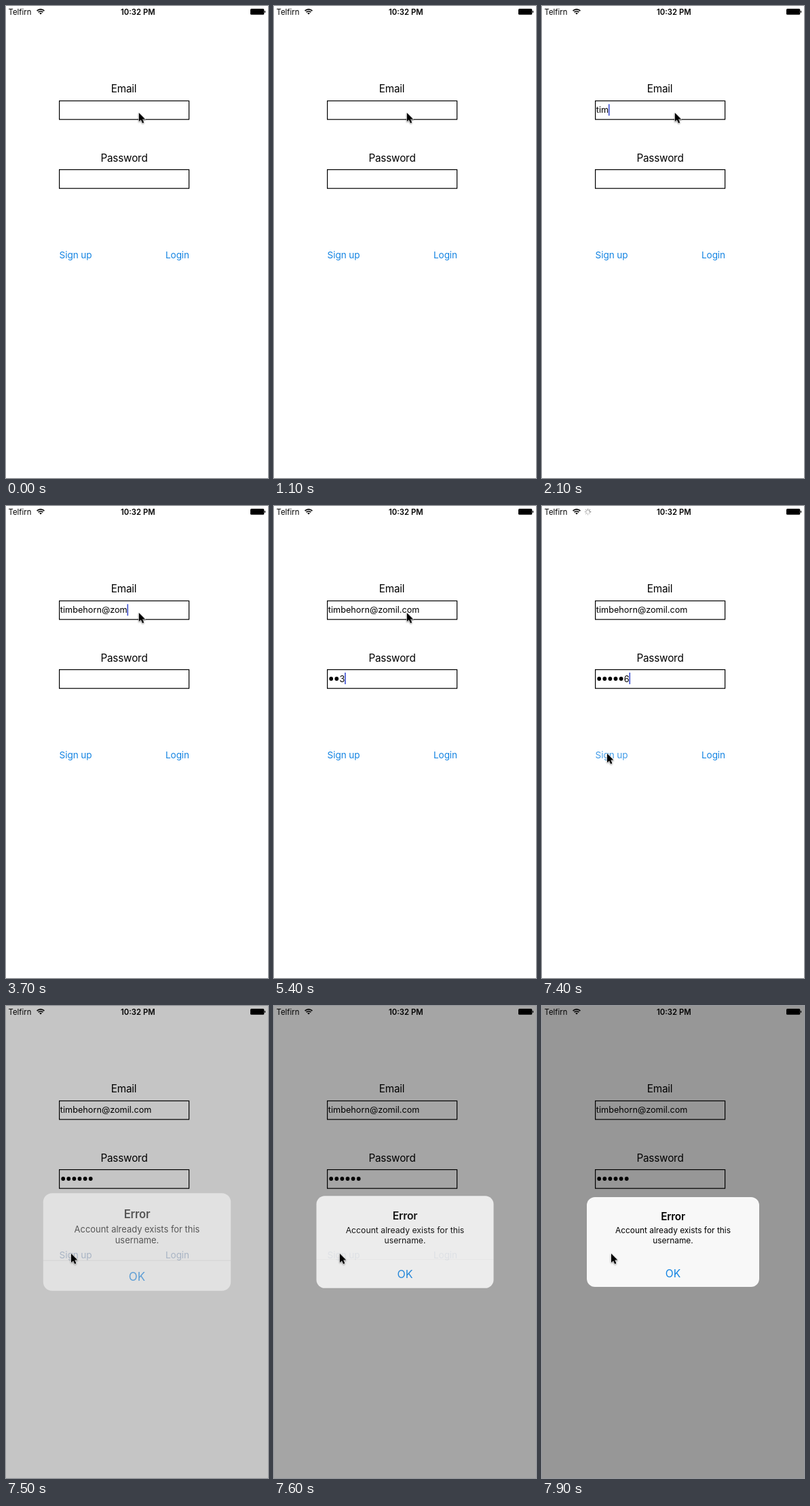
Animation, 386 px wide and 694 px high, one loop 8 s. Source, as an HTML page:

```html
<!DOCTYPE html>
<html lang="en">
<head>
<meta charset="utf-8">
<title>Sign up form</title>
<style>
  html, body { margin: 0; width: 100%; height: 100%; overflow: hidden; background: #fff; }
  svg { display: block; width: 100vw; height: 100vh; }
  text { font-family: Inter, "Open Sans", sans-serif; white-space: pre; }
  .mid { text-anchor: middle; }
  .bar { font-size: 11.3px; }
  .label { font-size: 15.3px; letter-spacing: -.2px; }
  .link { font-size: 13.6px; letter-spacing: -.1px; fill: #1283e2; }
  .input { font-size: 12.7px; }
  .bold { font-weight: 600; }
  .box { fill: none; stroke: #000; stroke-width: 1.2; }
  .note { font-size: 11.9px; }
  #cursor { filter: drop-shadow(0 1.5px 1.2px rgba(0, 0, 0, .45)); }
</style>
</head>
<body>
<svg viewBox="0 0 386 694">
  <rect width="386" height="694" fill="#fff"/>

  <text class="bar" x="3.6" y="13">Telfirn</text>
  <g fill="none" stroke="#000" stroke-width="1.7">
    <path d="M45.6 7.1a7.5 7.5 0 0 1 10.8 0M47.6 9.2a4.7 4.7 0 0 1 6.8 0"/>
    <path d="M51 12.6l-1.8-1.9a2.6 2.6 0 0 1 3.6 0z" fill="#000" stroke="none"/>
  </g>
  <g id="spinner" stroke="#777" stroke-width="1.1" stroke-linecap="round"></g>
  <text class="bar bold mid" x="194.3" y="13">10:32 PM</text>
  <rect x="360" y="4" width="20.3" height="8.8" rx="1.6"/>
  <rect x="380.8" y="6.9" width="1.3" height="3" rx=".6"/>

  <text class="label mid" x="173.5" y="127.3">Email</text>
  <rect class="box" x="78.6" y="139.5" width="191" height="27.3"/>
  <text class="input" id="email" x="79.8" y="157.3"></text>

  <text class="label mid" x="174" y="228.6">Password</text>
  <rect class="box" x="78.6" y="240.6" width="191" height="27.6"/>
  <g id="dots"></g>
  <text class="input" id="digit" y="258.6"></text>
  <rect id="caret" width="1.6" height="17" fill="#3c4fd0"/>

  <text class="link" id="signup" x="78.6" y="371">Sign up</text>
  <text class="link" id="login" x="270" y="371" text-anchor="end">Login</text>

  <rect id="shade" width="386" height="694"/>
  <g id="alert">
    <rect x="-127" y="-66" width="254" height="132" rx="12" fill="#f8f8f8"/>
    <path id="rule" d="M-127 25H127" stroke="#b4b4b4" stroke-width=".8"/>
    <text class="label bold mid" y="-32">Error</text>
    <text class="note mid" y="-13">Account already exists for this</text>
    <text class="note mid" y="2">username.</text>
    <text class="mid" y="52" font-size="15.6" fill="#1283e2">OK</text>
  </g>

  <path id="cursor" d="M0 0V13.2l3-2.8 2.2 4.9 2.2-1-2.1-4.7h4.1z" stroke="#fff" stroke-width="1" paint-order="stroke"/>
</svg>
<script>
const LOOP = 8000, STEP = 100;
const EMAIL = "timbehorn@zomil.com";
const EMAIL_KEYS = [1800, 1800, 1900, 2300, 2400, 2500, 2700, 2800, 2900, 3100,
                    3300, 3600, 3700, 3800, 3900, 4100, 4200, 4400, 4600];
const PASS_KEYS = [5100, 5200, 5400, 5600, 5900, 6100];
const PASS_FOCUS = 4800, ALERT = 7400, DOT = 8.1;

const $ = id => document.getElementById(id);
const [email, digit, caret, signup, login, shade, alertBox, rule, cursor, spinner, dots] =
  ["email", "digit", "caret", "signup", "login", "shade", "alert", "rule", "cursor", "spinner", "dots"].map($);

const set = (el, attrs) => { for (const k in attrs) el.setAttribute(k, attrs[k]); };
const add = (parent, tag, attrs) => {
  const el = document.createElementNS("http://www.w3.org/2000/svg", tag);
  set(el, attrs);
  return parent.appendChild(el);
};
const clamp = v => Math.min(1, Math.max(0, v));
const ramp = (t, from, to) => clamp((t - from) / (to - from));
const mix = (a, b, p) => a + (b - a) * p;
const smooth = p => p * p * (3 - 2 * p);
const typed = (keys, t) => keys.filter(k => t >= k).length;

const spokes = Array.from({ length: 8 }, (_, i) =>
  add(spinner, "path", { d: "M0 -2.4V-4.3", transform: `translate(67.6 8.6) rotate(${i * 45})` }));
const bullets = PASS_KEYS.map((_, i) =>
  add(dots, "circle", { cx: 84.2 + i * DOT, cy: 254, r: 2.9 }));

function caretOpacity(t) {
  if (t >= 7500) return 0;
  if (t < 1200) return ramp(t, 200, 400) * (1 - ramp(t, 800, 1100));
  return ramp(t, 1300, 1500);
}

function drawFields(t) {
  email.textContent = EMAIL.slice(0, typed(EMAIL_KEYS, t));
  const n = typed(PASS_KEYS, t);
  const open = n > 0 && t < 7500;
  const hidden = open ? n - 1 : n;
  bullets.forEach((b, i) => set(b, { opacity: i < hidden ? 1 : 0 }));
  digit.textContent = open ? n : "";
  const digitX = 80.3 + hidden * DOT;
  set(digit, { x: digitX });

  const inPass = t >= PASS_FOCUS;
  const x = inPass
    ? digitX + (open ? digit.getComputedTextLength() : 0)
    : 79.8 + (email.textContent ? email.getComputedTextLength() : 0);
  set(caret, { x: x - .2, y: inPass ? 245 : 144.3, opacity: caretOpacity(t) });
}

function drawAlert(t) {
  const p = 1 - Math.pow(1 - ramp(t, ALERT, ALERT + 400), 2.85);
  set(shade, { opacity: .408 * p });
  set(alertBox, { opacity: p, transform: `translate(193 347) scale(${mix(1.2, 1, p)})` });
  set(rule, { opacity: 1 - p });
  const fill = t > ALERT ? "#5578a8" : "#1283e2";
  signup.style.fill = login.style.fill = fill;
  set(signup, { opacity: t < 7100 || t > ALERT ? 1 : mix(.2, .8, ramp(t, 7200, 7400)) });
}

function drawCursor(t) {
  const p = smooth(ramp(t, 6200, 6900));
  const x = mix(195.8, 96, p) + 6 * smooth(ramp(t, 7500, 7900));
  set(cursor, { transform: `translate(${x} ${mix(156.9, 364, p)})` });
}

function drawSpinner(t) {
  set(spinner, { opacity: t >= 7200 && t <= 7400 ? 1 : 0 });
  const head = t / STEP;
  spokes.forEach((s, i) => set(s, { opacity: 1 - ((head - i + 80) % 8) * .09 }));
}

function render(time) {
  const t = Math.floor((time % LOOP) / STEP) * STEP;
  drawFields(t);
  drawAlert(t);
  drawCursor(t);
  drawSpinner(t);
}

function tick() {
  render(performance.now());
  requestAnimationFrame(tick);
}
tick();
</script>
</body>
</html>
```
